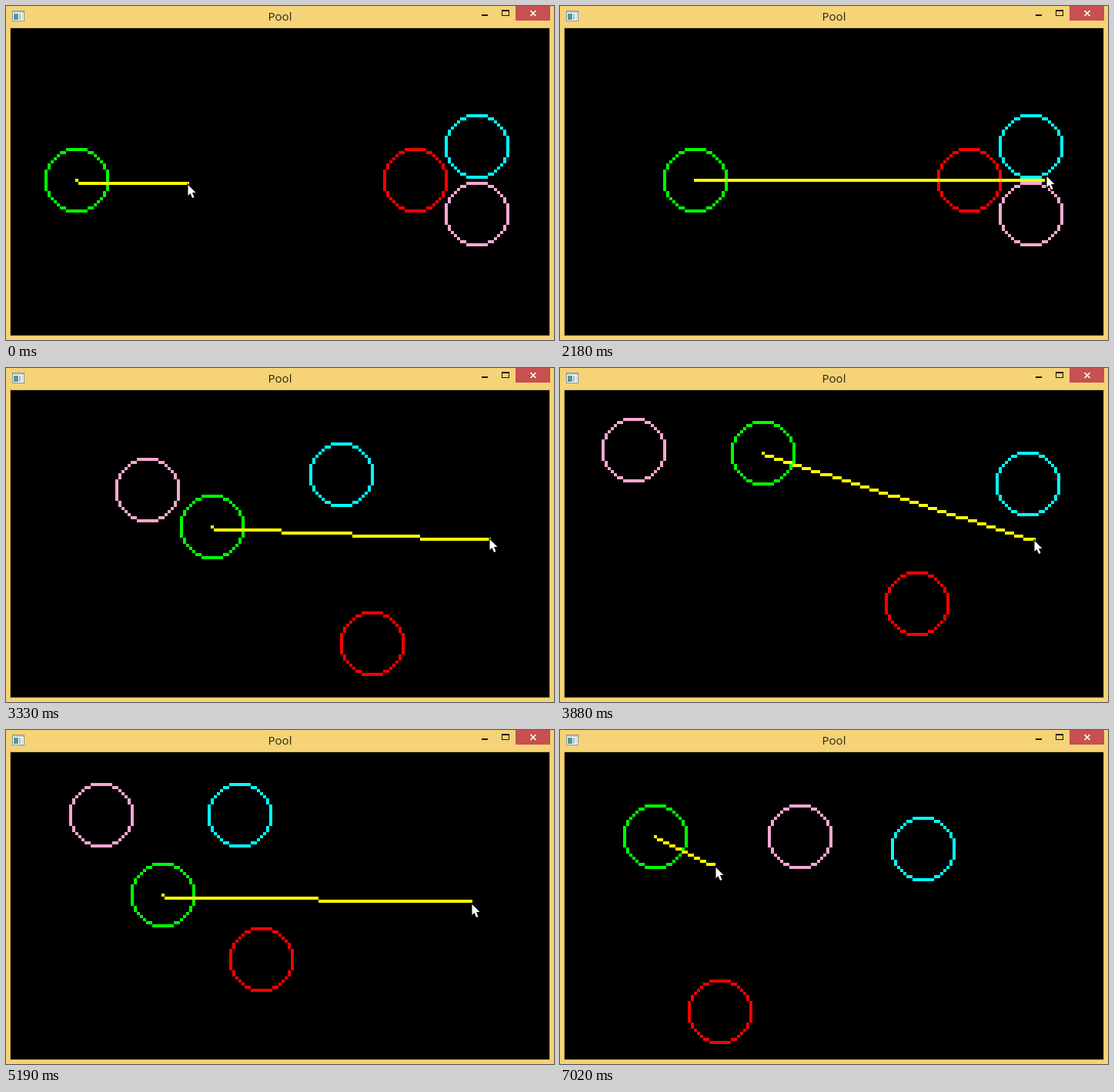
Animation of 712 by 435 pixels, one loop 7.1 s. Source, as an HTML page with a canvas:

```html
<!DOCTYPE html>
<html lang="en">
<head>
<meta charset="utf-8">
<title>Pool</title>
<style>
html, body { margin: 0; width: 100%; height: 100%; overflow: hidden; background: #f5d376; }
canvas { display: block; }
</style>
</head>
<body>
<canvas id="stage" width="712" height="435"></canvas>
<script>
const ctx = document.getElementById('stage').getContext('2d');
const LOOP = 7100, REDRAW = 77;
const CELL = 4, LEFT = 6, TOP = 29, RADIUS = 10;
const WALLS = { left: 10, right: 164, top: 10, bottom: 89 };
const FRICTION = 0.8;
const PAPER = '#f5d376', INK = '#1c1810';

const SHOT = 2148, BREAK = 2290;
const stops = [0, 2180, 3330, 4500, 5190, 6200, 7020, LOOP];
const hits = [SHOT, BREAK, ...stops.slice(2, 7)];

// Column and row at each hit; a place beyond a wall is reached by bouncing off it.
const balls = [
  { color: '#ff0000', path: [[131, 49], [117, 96], [111, 129], [81, 67], [56, 85], [50, 94]] },
  { color: '#00ffff', path: [[151, 38], [415, -7], [229, 32], [74, 0], [60, 42], [116, 31]] },
  { color: '#f7a8d0', path: [[151, 60], [284, 146], [7, 9], [29, 20], [43, 28], [76, -7]] },
  { color: '#00ff00', path: [[21, 49], [111, 49], [65, 134], [64, 3], [49, 46], [30, 58], [29, 27]] }
];
const cueBall = balls[3];

// Pointer x and y, cue column and row at each stop.
const mouse = [[236, 232, 57, 50], [632, 221, 155, 49], [628, 222, 155, 48], [614, 225, 151, 48],
  [605, 226, 149, 48], [167, 129, 40, 24], [202, 178, 48, 36]];
// How fast the hand slows down on each leg; negative speeds up.
const pace = [3, 3, 3, 3, -3, 3];

const legAt = (times, t) => times.findLastIndex(start => start <= t);

// Share of a leg covered when speed decays at the given rate.
function glide(t, from, to, drag) {
  const covered = ms => 1 - Math.exp(-drag * ms / 1000);
  return covered(t - from) / covered(to - from);
}

const mix = (a, b, k) => a.map((v, i) => v + (b[i] - v) * k);

function fold(v, low, high) {
  const span = high - low;
  const m = (((v - low) % (2 * span)) + 2 * span) % (2 * span);
  return low + (m > span ? 2 * span - m : m);
}

const inside = ([x, y]) =>
  [fold(x, WALLS.left, WALLS.right), fold(y, WALLS.top, WALLS.bottom)];

function ballAt({ path }, t) {
  const times = hits.slice(-path.length);
  const i = legAt(times, t);
  if (i < 0) return path[0];
  const start = inside(path[i]);
  if (i === path.length - 1) return start;
  const k = glide(t, times[i], times[i + 1], FRICTION);
  return inside(mix(start, path[i + 1], k)).map(Math.round);
}

function mouseAt(t) {
  const i = legAt(stops, t);
  if (i >= pace.length) return mouse[pace.length];
  const k = glide(t, stops[i], stops[i + 1], pace[i]);
  return mix(mouse[i], mouse[i + 1], k).map(Math.round);
}

// The window is repainted in even steps between stops.
function snap(t) {
  const i = legAt(stops, t);
  const span = stops[i + 1] - stops[i];
  const step = span / Math.round(span / REDRAW);
  return stops[i] + Math.floor((t - stops[i]) / step) * step;
}

function rect(color, x, y, w, h) {
  ctx.fillStyle = color;
  ctx.fillRect(x, y, w, h);
}

function plot(x, y) {
  ctx.fillRect(LEFT + x * CELL, TOP + y * CELL, CELL, CELL);
}

function circle(cx, cy, r) {
  let x = 0, y = r, p = 3 - 2 * r;
  while (y >= x) {
    for (const sx of [-1, 1]) for (const sy of [-1, 1]) {
      plot(cx + sx * x, cy + sy * y);
      plot(cx + sx * y, cy + sy * x);
    }
    if (p < 0) p += 4 * x++ + 6;
    else p += 4 * (x++ - y--) + 10;
  }
}

function line(x0, y0, x1, y1) {
  const steep = Math.abs(y1 - y0) > Math.abs(x1 - x0);
  let a = steep ? [y0, x0] : [x0, y0];
  let b = steep ? [y1, x1] : [x1, y1];
  if (a[0] > b[0]) [a, b] = [b, a];
  const len = b[0] - a[0], rise = b[1] - a[1];
  for (let i = 0; i <= len; i++) {
    const m = a[0] + i;
    const n = a[1] + (len ? Math.sign(rise) * Math.ceil(i * Math.abs(rise) / len) : 0);
    if (steep) plot(n, m);
    else plot(m, n);
  }
}

function pointer(x, y) {
  const shape = [[0, 0], [0, 14], [3, 11], [5.5, 17], [8, 16], [5.5, 10], [10, 10]];
  ctx.beginPath();
  shape.forEach(([dx, dy]) => ctx.lineTo(x + dx + 0.5, y + dy + 1));
  ctx.closePath();
  ctx.lineWidth = 2;
  ctx.strokeStyle = '#000';
  ctx.stroke();
  ctx.fillStyle = '#fff';
  ctx.fill();
}

function drawIcon(x, y) {
  rect('#8a8f94', x, y, 16, 14);
  rect('#fff', x + 1, y + 1, 14, 12);
  rect('#b9c6d2', x + 1, y + 1, 14, 2);
  rect('#4f9a90', x + 2, y + 4, 6, 8);
  rect('#9db8c8', x + 9, y + 4, 2, 8);
  rect('#d5dade', x + 12, y + 4, 2, 8);
}

function drawButtons() {
  rect(INK, 618, 11, 8, 2);
  rect(INK, 644, 5, 10, 8);
  rect(PAPER, 645, 7, 8, 5);
  rect('#c75050', 662, 0, 45, 19);
  ctx.strokeStyle = '#fff';
  ctx.lineWidth = 1.7;
  ctx.beginPath();
  for (const side of [-3.5, 3.5]) {
    ctx.moveTo(685 + side, 6);
    ctx.lineTo(685 - side, 13);
  }
  ctx.stroke();
}

function drawWindow() {
  rect(PAPER, 0, 0, 712, 435);
  rect('#cbae62', LEFT - 1, TOP - 1, 702, 402);
  rect('#000', LEFT, TOP, 700, 400);
  drawIcon(8, 6);
  ctx.fillStyle = '#2a2416';
  ctx.font = '15px "Open Sans", "Noto Sans", sans-serif';
  ctx.textAlign = 'center';
  ctx.fillText('Pool', 356, 19);
  drawButtons();
}

function draw(t) {
  drawWindow();
  for (const ball of balls) {
    ctx.fillStyle = ball.color;
    circle(...ballAt(ball, t), RADIUS);
  }
  const [x, y, column, row] = mouseAt(t);
  ctx.fillStyle = '#ffff00';
  line(...ballAt(cueBall, t), column, row);
  pointer(x, y);
}

const began = performance.now();
function tick() {
  draw(snap((performance.now() - began) % LOOP));
  requestAnimationFrame(tick);
}
tick();
</script>
</body>
</html>
```
